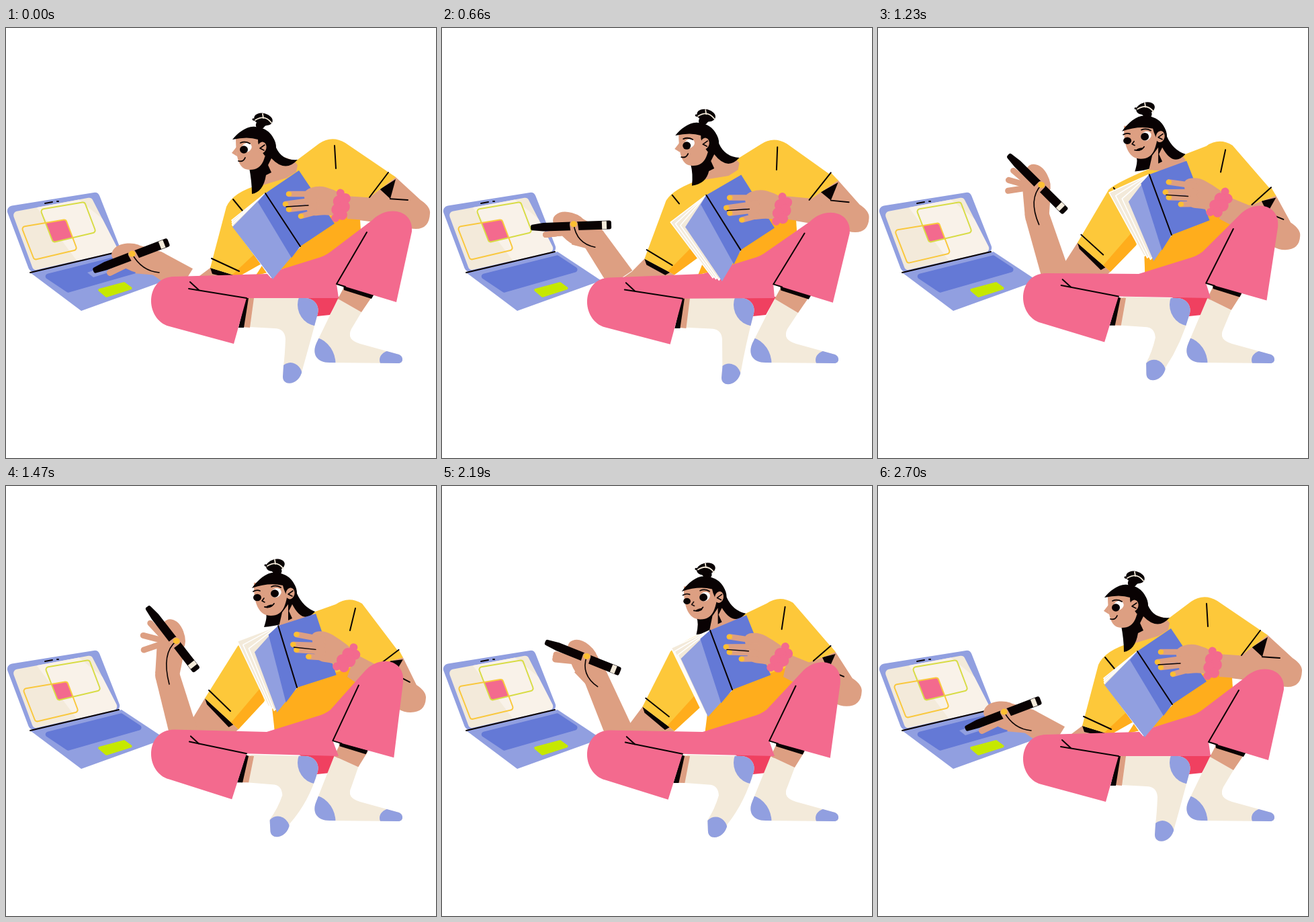
Animation, 640 px wide and 640 px high, one loop 2730 ms. Source, as an HTML page with a canvas:

```html
<!DOCTYPE html>
<html lang="en">
<head>
<meta charset="utf-8">
<title>Studying on the floor</title>
<style>
html, body { margin: 0; width: 100%; height: 100%; overflow: hidden; background: #fff; }
canvas { display: block; width: 640px; height: 640px; }
</style>
</head>
<body>
<canvas id="stage" width="640" height="640"></canvas>
<script>
const ctx = document.getElementById('stage').getContext('2d');
const LOOP = 2730, STEP = 30;
const INK = '#090203', SKIN = '#dd9f82', PINK = '#f36a8e', RED = '#f04060', YELLOW = '#fdc83a',
  AMBER = '#ffad1c', BLUE = '#919fe0', DEEP = '#6479d6', CREAM = '#f3eada', LIME = '#c6e800',
  NAIL = '#fcbf32';

// Three drivers move the whole figure: sitting up, knee sway, pen angle in degrees.
const TIMES = [0, 660, 990, 1470, 1950, 2430, 2700];
const LIFT = [0, .33, .72, 1, .92, .36, 0];
const SWAY = [0, -.2, .2, .93, 1, .45, 0];
const TILT = [-21, -2, 30, 52, 38, 1, -21];
let lift, sway, tilt, turn;

// Monotone cubic through the key values, at rest at both ends.
function ease(v, t) {
  if (t >= 2700) return v[0];
  const rate = i => (v[i + 1] - v[i]) / (TIMES[i + 1] - TIMES[i]);
  const slope = i => {
    if (i === 0 || i === 6) return 0;
    const a = rate(i - 1), b = rate(i);
    return a * b > 0 ? 2 * a * b / (a + b) : 0;
  };
  let i = 0;
  while (t >= TIMES[i + 1]) i++;
  const h = TIMES[i + 1] - TIMES[i], u = (t - TIMES[i]) / h, w = 1 - u;
  return v[i] * (1 + 2 * u) * w * w + slope(i) * h * u * w * w
    + v[i + 1] * u * u * (3 - 2 * u) - slope(i + 1) * h * u * u * w;
}

// A point of the figure: rest place, shift at full lift, shift at full sway.
const body = (x, y, lx = 0, ly = 0, sx = 0, sy = 0) =>
  [x + lx * lift + sx * sway, y + ly * lift + sy * sway];
const leg = (x, y, sx, sy) => body(x, y, 0, 0, sx, sy);

const clamp = v => Math.min(1, Math.max(0, v));
const lerp = (a, b, u) => [a[0] + (b[0] - a[0]) * u, a[1] + (b[1] - a[1]) * u];
const bezier = (a, c, b, u) => lerp(lerp(a, c, u), lerp(c, b, u), u);
const add = (p, x, y) => [p[0] + x, p[1] + y];

function fill(path, color) { ctx.fillStyle = color; ctx.fill(path); }
function stroke(path, color = INK, width = 2) {
  ctx.strokeStyle = color; ctx.lineWidth = width; ctx.stroke(path);
}
function polyPath(points) {
  const p = new Path2D();
  points.forEach(q => p.lineTo(...q));
  p.closePath();
  return p;
}
function roundPath(points, r) {
  const p = new Path2D(), n = points.length;
  p.moveTo(...lerp(points[n - 1], points[0], .5));
  points.forEach((q, i) => p.arcTo(...q, ...points[(i + 1) % n], r));
  p.closePath();
  return p;
}
function blob(points, color) {
  const p = new Path2D(), n = points.length;
  p.moveTo(...lerp(points[n - 1], points[0], .5));
  points.forEach((q, i) => p.quadraticCurveTo(...q, ...lerp(q, points[(i + 1) % n], .5)));
  fill(p, color);
}
const poly = (points, color) => fill(polyPath(points), color);
function line(points, color, width) {
  const p = new Path2D();
  points.forEach(q => p.lineTo(...q));
  stroke(p, color, width);
}
function curve(a, c, b, color, width) {
  const p = new Path2D();
  p.moveTo(...a);
  p.quadraticCurveTo(...c, ...b);
  stroke(p, color, width);
}
function oval([x, y], rx, ry, color, angle = 0) {
  const p = new Path2D();
  p.ellipse(x, y, rx, ry, angle, 0, 7);
  fill(p, color);
}
function tube(a, b, ra, rb, color) {
  const angle = Math.atan2(b[1] - a[1], b[0] - a[0]), nx = -Math.sin(angle), ny = Math.cos(angle);
  poly([add(a, nx * ra, ny * ra), add(b, nx * rb, ny * rb),
    add(b, -nx * rb, -ny * rb), add(a, -nx * ra, -ny * ra)], color);
}
function clipped(path, draw) {
  ctx.save();
  ctx.clip(path);
  draw();
  ctx.restore();
}

function drawLaptop() {
  fill(roundPath([[-1, 266], [137, 244], [172, 333], [36, 364]], 8), BLUE);
  poly([[36, 364], [172, 333], [237, 376], [112, 421]], BLUE);
  const glass = roundPath([[9, 274], [127, 252], [168, 332], [41, 361]], 6);
  fill(glass, CREAM);
  clipped(glass, () => poly([[45, 266], [108, 255], [146, 286], [168, 331], [106, 347]], '#f9f2e9'));
  line([[36, 364], [168, 333]]);
  line([[58, 261], [69, 259]]);
  line([[76, 258], [78, 258]]);
  fill(roundPath([[53, 368], [172, 338], [207, 361], [92, 394]], 4), DEEP);
  ctx.globalAlpha = clamp(-tilt / 8 - 1.6);
  poly([[121, 364], [150, 354], [162, 361], [130, 371]], BLUE);
  ctx.globalAlpha = 1;
  fill(roundPath([[135, 389], [176, 378], [190, 388], [149, 401]], 2), LIME);

  const slide = clamp(tilt / 52);
  const frame = (x, y) => roundPath([[x, y], [x + 66, y - 11], [x + 83, y + 34], [x + 19, y + 49]], 4);
  const gold = frame(23 + 2 * slide, 296 + 6 * slide), green = frame(51 + 7 * slide, 270);
  clipped(green, () => fill(gold, PINK));
  stroke(green, '#d8dc46');
  stroke(gold, '#f9c83e');
}

// The hand is rigid around the pen; only the free fingers fan out.
function drawFarArm(sleeve) {
  const raise = (tilt + 21) / 73, angle = tilt * Math.PI / 180;
  const cos = Math.cos(angle), sin = Math.sin(angle);
  const grip = bezier([186, 340], [191, 243], [247, 227], raise);
  const wrist = bezier([225, 350], [222, 264], [240, 281], raise);
  const hand = (x, y) => add(grip, x * cos - y * sin, x * sin + y * cos);

  poly([body(284, 372, -5, -28), sleeve.hem, sleeve.hemIn, [320, 385], [250, 385]], SKIN);
  tube(wrist, body(267, 376, -3, -10), 18, 21, SKIN);
  tube(hand(8, 8), wrist, 21, 18, SKIN);
  oval(wrist, 18, 18, SKIN);
  blob([[-32, -9], [-14, -25], [18, -15], [28, 8], [14, 32], [-6, 24]].map(q => hand(...q)), SKIN);
  const spread = clamp(tilt / 52) ** 2;
  for (let i = 0; i < 3; i++) {
    const a = (175 - 32 * i * spread) * Math.PI / 180;
    line([hand(0, 8), hand(2 + 40 * Math.cos(a), 8 + 38 * Math.sin(a))], SKIN, 9);
  }

  ctx.save();
  ctx.translate(...grip);
  ctx.rotate(angle);
  fill(roundPath([[-60, -4], [-41, -6.5], [60, -6.5], [60, 6.5], [-41, 6], [-60, 4]], 3), INK);
  ctx.fillStyle = CREAM;
  ctx.fillRect(46, -6, 7, 12);
  ctx.restore();

  const nail = hand(3 + 4 * raise, -3), bend = hand(7, 26);
  line([nail, lerp(nail, bend, .5)], SKIN, 12);
  curve(nail, bend, add(wrist, 3, 14), INK, 1.6);
  oval(nail, 5, 4.5, NAIL);
}

function drawShirt(sleeve, neck) {
  const { neckLeft, hem, hemIn, pit } = sleeve;
  const top = body(485, 166, 25, 4), corner = body(580, 222, 22, 22, -12, 12);
  const low = body(541, 252, 17, 12), hemTop = body(569, 215, 24, 12, -9, 18);
  const near = body(505, 250, 15, 0), bend = body(598, 256, 15, 20, -13, 17);
  const right = body(631, 276, 6, 28, -13, 13), bottom = body(610, 299, 6, 24, -15, 15);

  const limb = new Path2D();
  limb.moveTo(...corner);
  limb.lineTo(...add(right, -14, -20));
  limb.quadraticCurveTo(right[0] + 1, right[1] - 10, ...right);
  limb.quadraticCurveTo(right[0] - 1, bottom[1], ...bottom);
  limb.quadraticCurveTo(bottom[0] - 10, bottom[1], bottom[0] - 18, bottom[1] - 5);
  [[508, 284], near, low].forEach(q => limb.lineTo(...q));
  fill(limb, SKIN);
  poly([add(corner, 0, 3), lerp(corner, low, .6), lerp(near, bend, .72)], INK);

  const inner = lerp(hem, hemIn, .85);
  poly([hem, inner, add(inner, -7, 4), add(hem, 3, 9)], INK);
  const arm = new Path2D();
  arm.moveTo(...neckLeft);
  arm.quadraticCurveTo(...body(338, 244, 18, -15), ...body(328, 266, 17, -28));
  [hem, hemIn, pit, [400, 300]].forEach(q => arm.lineTo(...q));
  fill(arm, YELLOW);
  poly([hemIn, lerp(hem, hemIn, .78), add(pit, -4, -22), pit], AMBER);

  const base = body(372, 368, 28, -2), torso = new Path2D();
  torso.moveTo(...neckLeft);
  torso.lineTo(...neck);
  torso.lineTo(...add(top, -19, 6));
  torso.quadraticCurveTo(top[0], top[1] - 7, top[0] + 20, top[1] + 5);
  [corner, low, [524, 270], [528, 302], [470, 345], base, [398, 334], [384, 300]]
    .forEach(q => torso.lineTo(...q));
  fill(torso, YELLOW);
  poly([[396, 330], [430, 298], [520, 268], [527, 285], [528, 302], [470, 345], base], AMBER);
  // the forearm stays in front of the shirt body
  poly([near, lerp(near, bend, .5), add(bottom, -30, -10), [508, 284]], SKIN);
  poly([low, hemTop, corner, lerp(corner, low, .6)], YELLOW);
  line([low, hemTop]);
  line([body(489, 175, 31, 7), body(491, 209, 21, 6)]);
  line([lerp(near, bend, .72), bend]);
  line([body(306, 343, -4, -39), body(347, 362, -13, -27)]);
  line([body(338, 255, 14, -19), body(352, 272, 3, -32)]);
}

function drawHead(sleeve, tail) {
  const o = body(365, 180, 31, -18);
  const mix = (a, b) => a + (b - a) * turn;
  const at = (x, y) => add(o, x, y);
  const strand = body(366, 247, 18, -37), side = body(362, 208, 24, -18);
  const bun = at(mix(18, 5), -44);

  poly([at(12, 0), add(tail, -6, 1), add(tail, 0, 8), add(tail, -2, 18), add(tail, -16, 27),
    add(sleeve.neckLeft, 4, 1), add(side, 14, 10)], SKIN);

  const hair = new Path2D();
  hair.moveTo(...at(15, -30));
  hair.quadraticCurveTo(...at(37, -20), ...at(37, -2));
  hair.quadraticCurveTo(...at(46, 18), ...tail);
  hair.quadraticCurveTo(tail[0] - 18, tail[1] + 20, ...at(30, 14));
  hair.lineTo(...at(25, 24));
  hair.lineTo(...at(30, 35));
  hair.lineTo(...at(22, 39));
  hair.quadraticCurveTo(o[0] + 18, strand[1] - 3, ...strand);
  hair.quadraticCurveTo(side[0] + 4, strand[1] - 18, ...side);
  hair.closePath();
  fill(hair, INK);
  if (turn > .05) poly([at(24 - 9 * turn, 26), at(24, 14), at(24, 46), at(24 - 14 * turn, 48)], SKIN);

  const face = new Path2D();
  face.moveTo(...at(mix(-23, -27), -18));
  face.bezierCurveTo(...at(mix(-23, -28), 16), ...at(-18, 31), ...at(-2, 31));
  face.bezierCurveTo(...at(18, 31), ...at(22, 14), ...at(25, -20));
  fill(face, SKIN);
  poly([at(-22, -3), at(mix(-29, -22), 6), at(-21, 11)], SKIN);

  const cap = new Path2D(), tip = at(mix(-28, -30), mix(-14, -10));
  cap.moveTo(...tip);
  cap.bezierCurveTo(...at(-20, -24), ...at(-6, -35), ...at(6, -33));
  cap.bezierCurveTo(...at(28, -31), ...at(37, -16), ...at(37, 4));
  cap.lineTo(...at(mix(20, 27), 10));
  cap.quadraticCurveTo(...at(mix(9, 18), -4), ...at(mix(10, 16), -14));
  cap.quadraticCurveTo(...at(-5, -19), ...tip);
  fill(cap, INK);

  const ear = at(mix(16, 27), -2);
  oval(ear, 6.5, 8.5, SKIN, .2);
  line([add(ear, 4, -4), add(ear, -3, 1), add(ear, 3, 4)], INK, 1.6);

  const eye = at(mix(-11, 4), mix(1, -2));
  oval(add(eye, mix(4, 2), mix(-3, -1)), 8, 6.5, '#fff', -.5);
  oval(eye, 6, 5.8, INK);
  curve(add(eye, -5, -10), add(eye, 2, -13), add(eye, 9, -9), INK, 1.8);
  if (turn > .05) {
    oval(at(-22, 4), 6 * turn, 5.2 * turn, INK);
    ctx.globalAlpha = turn;
    curve(at(-28, -5), at(-23, -8), at(-18, -6), INK, 1.8);
    line([at(-12, 5), at(-15, 9), at(-11, 11)], INK, 1.6);
    oval(at(-4, 17), 5, 1.8, INK, -.3);
    ctx.globalAlpha = 1;
  }
  curve(at(mix(-19, -11), 18), at(mix(-12, -2), 20), at(mix(-9, 3), 13), INK, 1.8);

  line([add(bun, -1, 4), lerp(bun, at(10, -30), .6)], INK, 13);
  oval(bun, 14, 9, INK, .25 - .5 * turn);
  line([add(bun, -8, 2), add(bun, -15, 0)], INK, 3);
  curve(add(bun, -12, 1), add(bun, 2, -8), add(bun, 12, 5), CREAM, 1.8);
  line([add(bun, -1, -8), add(bun, 0, -2)], CREAM, 1.8);
}

function drawFeet() {
  poly([[437, 400], [497, 400], [482, 427], [463, 429]], RED);

  const cuffIn = leg(494, 403, -6, -1), cuffOut = leg(529, 423, -5, -5), sock = new Path2D();
  sock.moveTo(...cuffIn);
  sock.lineTo(...cuffOut);
  sock.lineTo(514, 448);
  sock.quadraticCurveTo(506, 464, 527, 470);
  sock.lineTo(585, 486);
  sock.bezierCurveTo(592, 489, 592, 499, 584, 499);
  sock.lineTo(482, 498);
  sock.bezierCurveTo(462, 498, 455, 485, 462, 469);
  fill(sock, CREAM);
  clipped(sock, () => {
    oval([462, 493], 27, 34, BLUE, -.45);
    oval([576, 494], 20, 15, BLUE);
  });
  poly([leg(503, 386, -6, -3), leg(546, 398, -8, -3), cuffOut, cuffIn], SKIN);
  poly([leg(502, 383, -6, -2), leg(548, 396, -10, -3), leg(544, 403, -9, -4), leg(503, 390, -7, -3)], INK);

  const toe = leg(426, 513, -20, -7), foot = new Path2D();
  foot.moveTo(365, 400);
  foot.lineTo(446, 402);
  foot.bezierCurveTo(460, 403, 467, 414, 464, 425);
  foot.quadraticCurveTo(...leg(452, 470, -1, 0), ...add(toe, 15, -4));
  foot.bezierCurveTo(...add(toe, 12, 18), ...add(toe, -14, 22), ...add(toe, -14, 6));
  foot.lineTo(...add(toe, -13 - 2 * sway, -10));
  foot.quadraticCurveTo(...leg(415, 488, -11, -9), ...leg(416, 463, -5, -3));
  foot.quadraticCurveTo(...leg(415, 447, -5, -3), ...leg(399, 447, -3, -3));
  foot.lineTo(...leg(362, 445, -3, -4));
  fill(foot, CREAM);
  clipped(foot, () => {
    oval([466, 412], 32, 32, BLUE);
    oval(add(toe, -2, 4), 17, 19, BLUE, -.2);
  });
  poly([[358, 401], [369, 402], leg(363, 446, -2, -5), leg(351, 445, -1, -4)], SKIN);
  poly([[357, 400], [361, 402], leg(354, 446, -2, -5), leg(346, 446, -2, -5)], INK);
}

function drawTrousers() {
  const hem = leg(358, 402, 0, -4), cuff = leg(492, 381, -6, -2), p = new Path2D();
  p.moveTo(...leg(250, 370, 0, -8));
  p.bezierCurveTo(...leg(206, 371, 0, -8), ...leg(206, 434, 0, -8), ...leg(243, 444, 0, -8));
  [leg(339, 470, -3, -4), hem, [495, 402], cuff, leg(581, 408, -4, -4), leg(604, 303, -14, -11)]
    .forEach(q => p.lineTo(...q));
  p.bezierCurveTo(...leg(607, 271, -13, -13), ...leg(569, 262, -13, -13), ...leg(545, 286, -12, -11));
  p.lineTo(483, 333);
  p.quadraticCurveTo(474, 340, 462, 343);
  p.lineTo(388, 366);
  fill(p, PINK);
  line([leg(274, 378, 1, -6), leg(287, 390, 0, -7)]);
  line([leg(272, 388, 1, -8), hem]);
  line([leg(537, 304, -13, -8), cuff, add(cuff, 13, 4)]);
}

function drawBook() {
  const spine = body(386, 246, 21, -10, -2, -30), spineLow = body(438, 325, 10, 0, -16, -27);
  const left = body(337, 296, 59, -19, -28, -32), low = body(397, 374, 39, -9, -35, -30);
  const page = body(336, 286, 11, -16, -3, -42), pageLow = body(390, 366, 24, -4, -25, -36);
  for (let i = 0; i < 3; i++) {
    const sheet = polyPath([spine, lerp(page, left, i / 3), lerp(pageLow, low, i / 3), spineLow]);
    fill(sheet, CREAM);
    stroke(sheet, '#fff', 1.6);
  }
  poly([spine, spineLow, low, left], BLUE);
  poly([spine, spineLow, body(425, 342, 14, 10, -24, -32), body(375, 259, 25, -8, -10, -32)], DEEP);
  poly([spine, body(436, 212, 27, 3, -2, -27), body(489, 291, 12, 8, -10, -19), spineLow], DEEP);
  line([spine, spineLow]);
}

function drawNearHand() {
  const shift = body(0, 0, 18, 0, -7, -28), drift = body(0, 0, 18, 7, -9, -16);
  // weight 0 follows the fingertips, weight 1 the wrist
  const at = (x, y, w) => add(lerp(shift, drift, w), x, y);
  blob([at(442, 242, .1), at(465, 234, .4), at(487, 240, .8), at(508, 252, 1),
    at(503, 284, 1), at(478, 277, .7), at(450, 281, .3), at(446, 262, .1)], SKIN);
  [[421, 247], [416, 262], [421, 270], [439, 280]].forEach(([x, y], i) => {
    const end = at(x, y, 0);
    line([end, at(461, 247 + 9 * i, .4)], SKIN, 8.5);
    oval(end, 4.2, 3.6, NAIL);
  });
  line([at(417, 266, 0), at(450, 264, .3)], INK, 1.4);

  // scrunchie: a ruffled band around the wrist
  ctx.save();
  ctx.translate(...add(drift, 498, 265));
  ctx.rotate(.2 + .3 * lift + .25 * sway);
  for (let i = 0; i < 7; i++) {
    const r = 6 + 3 * Math.sin(i * Math.PI / 6);
    oval([i % 2 ? 5 : -4, -19 + 6.3 * i], r, r, PINK);
  }
  ctx.restore();
}

function render(now) {
  const t = Math.floor((now % LOOP) / STEP) * STEP;
  [lift, sway, tilt] = [LIFT, SWAY, TILT].map(keys => ease(keys, t));
  turn = clamp((lift - .4) / .33);
  const sleeve = {
    neckLeft: body(378, 233, 27, -25), hem: body(304, 357, -8, -41),
    hemIn: body(346, 370, 0, -8), pit: body(385, 348, -1, -27)
  };
  const neck = body(434, 196, 26, -9);

  ctx.clearRect(0, 0, 640, 640);
  ctx.lineCap = ctx.lineJoin = 'round';
  drawLaptop();
  drawFarArm(sleeve);
  drawShirt(sleeve, neck);
  drawHead(sleeve, neck);
  drawFeet();
  drawTrousers();
  drawBook();
  drawNearHand();
}

const start = performance.now();
function tick() {
  render(performance.now() - start);
  requestAnimationFrame(tick);
}
tick();
</script>
</body>
</html>
```
